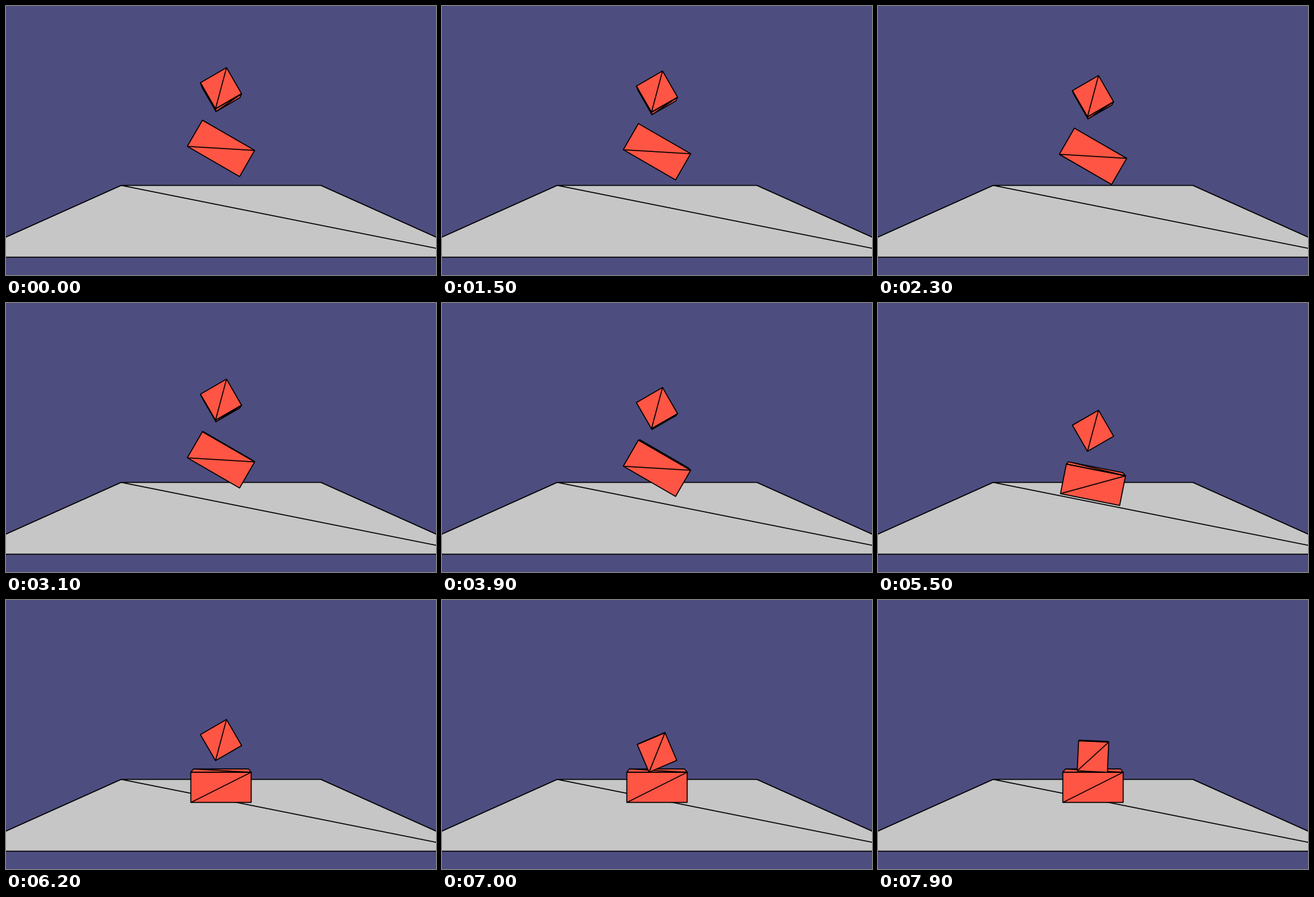
An HTML page with a canvas that plays this animation: 640x400 px, repeating every 8000 ms.

```html
<!DOCTYPE html>
<html lang="en">
<head>
<meta charset="utf-8">
<title>Falling boxes</title>
<style>
  html, body { margin: 0; width: 100%; height: 100%; overflow: hidden; background: #4d4d80; }
  canvas { display: block; }
</style>
</head>
<body>
<canvas id="stage" width="640" height="400"></canvas>
<script>
const ctx = document.getElementById('stage').getContext('2d');
const LOOP = 8000, STEP = 100;
const FOCAL = 200 / Math.tan(Math.PI / 8);
const DISTANCE = 22.5;
const FLOOR = -4.5, SHELF = -2.5;
const FALL = 0.0996;
const RED = '#ff5544', GREY = '#c6c6c6';

// Corner index bits: 1 = right, 2 = top, 4 = near. Diagonals join the first and third corner.
const FACES = [[0, 1, 5, 4], [2, 6, 7, 3], [0, 4, 6, 2], [1, 3, 7, 5], [4, 5, 7, 6]];

const rad = deg => deg * Math.PI / 180;

function project([x, y, z]) {
  const s = FOCAL / (DISTANCE - z);
  return [320 + x * s, 200 - y * s];
}

function trace(points) {
  ctx.beginPath();
  points.forEach(([x, y]) => ctx.lineTo(x, y));
  ctx.closePath();
}

function drawQuads(quads, color) {
  ctx.fillStyle = color;
  for (const q of quads) {
    trace(q);
    ctx.fill();
  }
  for (const [a, b, c, d] of quads) {
    trace([a, b, c, d]);
    ctx.moveTo(...a);
    ctx.lineTo(...c);
    ctx.stroke();
  }
}

function facesCamera([a, b, c]) {
  return (b[0] - a[0]) * (c[1] - b[1]) - (b[1] - a[1]) * (c[0] - b[0]) < 0;
}

function drawBox(halfWidth, y, deg) {
  const cos = Math.cos(rad(deg)), sin = Math.sin(rad(deg));
  const corners = [];
  for (let i = 0; i < 8; i++) {
    const px = i & 1 ? halfWidth : -halfWidth;
    const py = i & 2 ? 1 : -1;
    corners.push(project([px * cos - py * sin, y + px * sin + py * cos, i & 4 ? 1 : -1]));
  }
  drawQuads(FACES.map(f => f.map(i => corners[i])).filter(facesCamera), RED);
}

// Height of the centre when the lowest corner touches the support.
function restHeight(support, halfWidth, deg) {
  const a = rad(Math.abs(deg));
  return support + halfWidth * Math.sin(a) + Math.cos(a);
}

function drawLower(t) {
  const deg = Math.min(0, -30 + 21 * Math.max(0, t - 4.607));
  drawBox(2, Math.max(-0.52 - FALL * t * t, restHeight(FLOOR, 2, deg)), deg);
}

function drawUpper(t) {
  let deg = 30 - 33 * Math.max(0, t - 6.79);
  if (deg < 0) deg *= 0.4;
  drawBox(1, Math.max(3.46 - FALL * t * t, restHeight(SHELF, 1, deg)), deg);
}

function draw(t) {
  ctx.fillStyle = '#4d4d80';
  ctx.fillRect(0, 0, 640, 400);
  const y = -4.49;
  drawQuads([[[-10, y, -10], [-10, y, 10], [10, y, 10], [10, y, -10]].map(project)], GREY);
  drawLower(t);
  drawUpper(t);
}

ctx.strokeStyle = '#000';
ctx.lineWidth = 1.5;
ctx.lineJoin = 'round';

function tick() {
  const ms = performance.now() % LOOP;
  draw(Math.floor(ms / STEP) * STEP / 1000);
  requestAnimationFrame(tick);
}
tick();
</script>
</body>
</html>
```
